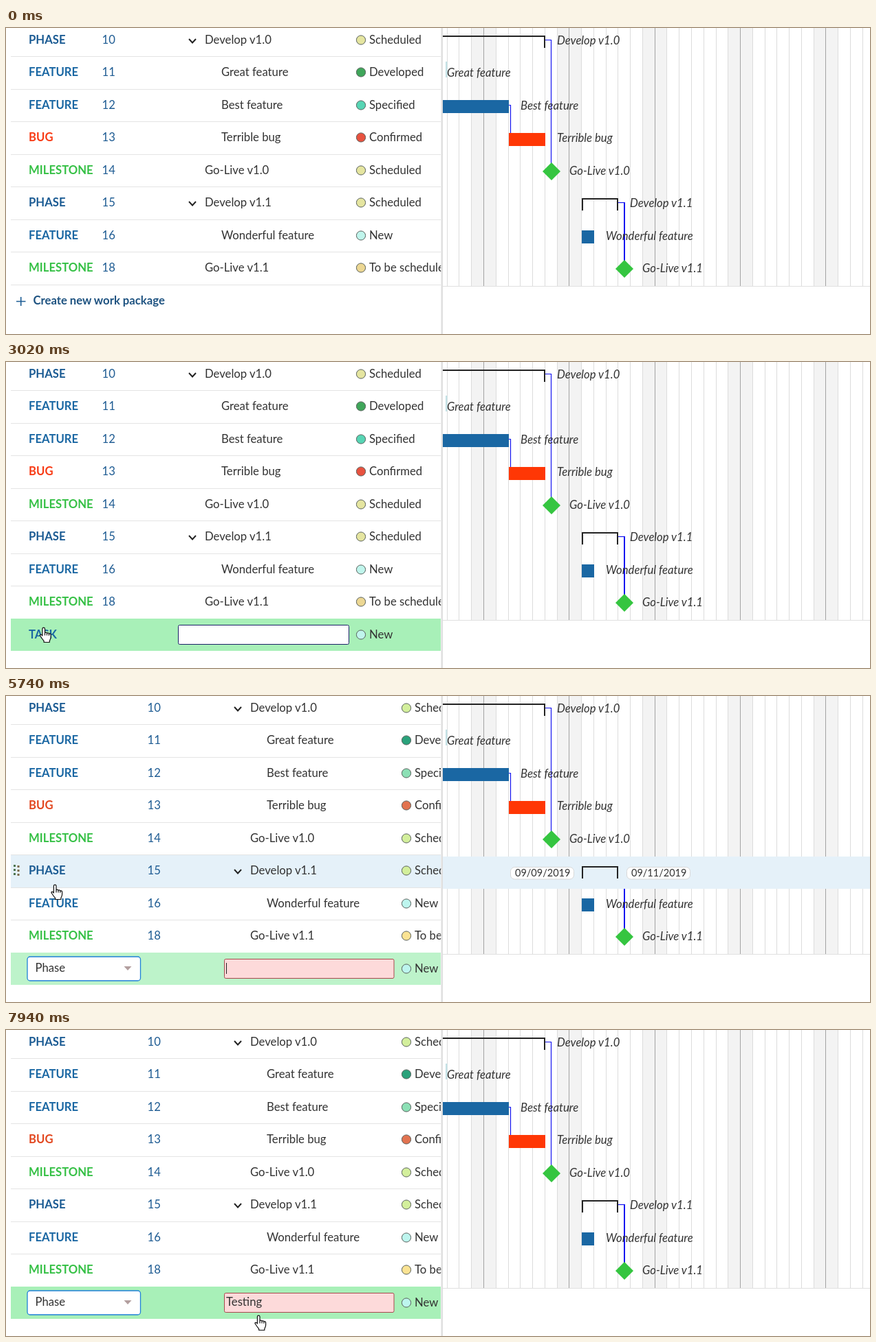
An HTML page for the animation above (8 s loop, 1256 by 446 pixels).

```html
<!DOCTYPE html>
<html lang="en">
<head>
<meta charset="utf-8">
<title>Work package table</title>
<style>
  html, body { margin: 0; width: 100%; height: 100%; overflow: hidden; background: #fff; }
  svg { display: block; width: 1256px; height: 446px; font: 16.7px Lato, sans-serif; }
  text { white-space: pre; }
</style>
</head>
<body>
<svg id="stage" viewBox="0 0 1256 446"></svg>
<script>
const stage = document.getElementById('stage');
const measure = document.createElement('canvas').getContext('2d');
const LOOP = 8000, PITCH = 47.5, BLUE = '#1a67a3', INK = '#333';

// Row: type, id, subject, status, subject x, label x in the chart
const ROWS = [
  ['PHASE', 10, 'Develop v1.0', 'Scheduled', 289, 801],
  ['FEATURE', 11, 'Great feature', 'Developed', 313, 641],
  ['FEATURE', 12, 'Best feature', 'Specified', 313, 748],
  ['BUG', 13, 'Terrible bug', 'Confirmed', 313, 801],
  ['MILESTONE', 14, 'Go-Live v1.0', 'Scheduled', 289, 819],
  ['PHASE', 15, 'Develop v1.1', 'Scheduled', 289, 907],
  ['FEATURE', 16, 'Wonderful feature', 'New', 313, 872],
  ['MILESTONE', 18, 'Go-Live v1.1', 'To be scheduled', 289, 925]
];
// Each pair: before and after the columns widen
const TYPE_COLORS = {
  PHASE: ['#1b5b93', '#1b5b93'], FEATURE: [BLUE, BLUE], TASK: [BLUE, BLUE],
  BUG: ['#f83a14', '#e2471f'], MILESTONE: ['#35c045', '#35c045']
};
const STATUS_COLORS = {
  Scheduled: ['#e5e5a0', '#d3ef9c'], Developed: ['#3fa65a', '#2aa27b'],
  Specified: ['#57d5b4', '#8ce0b5'], Confirmed: ['#e8523f', '#e27350'],
  New: ['#c0f5ec', '#bdf5ee'], 'To be scheduled': ['#ecd793', '#fbe393']
};
const OPTIONS = ['Task', 'Milestone', 'Phase', 'Feature', 'Bug'];

// Pointer tip: time, x, y
const PATH = [
  [720, 223, 441], [1240, 166, 397], [2710, 166, 397], [3020, 54.5, 387], [3100, 53, 387],
  [4113, 53, 387], [4570, 56, 304], [4960, 66, 268], [5040, 66, 268], [5120, 66, 272],
  [5270, 70, 274], [5360, 71, 275], [5740, 71, 275], [6440, 366, 422], [6520, 366, 416], [6610, 367, 416]
];
const CLICKS = [[1870, 2020, 166, 396.5], [3250, 3490, 52, 387], [5040, 5120, 66, 268]];
const KEYS = [[7070, 'T'], [7220, 'e'], [7370, 's'], [7450, 't'], [7620, 'i'], [7690, 'n'], [7860, 'g']];

const rect = (x, y, w, h, fill, extra = '') =>
  `<rect x="${x}" y="${y}" width="${w}" height="${h}" fill="${fill}" ${extra}/>`;
const line = (d, stroke, width, extra = '') =>
  `<path d="${d}" fill="none" stroke="${stroke}" stroke-width="${width}" ${extra}/>`;
const text = (x, y, s, fill = INK, extra = '') =>
  `<text x="${x}" y="${y}" fill="${fill}" ${extra}>${s}</text>`;
const shape = (d, fill) => `<path d="${d}" fill="${fill}"/>`;
const bold = 'font-weight="700"';
const baseline = i => Math.floor(23 + PITCH * i);
const rowTop = i => Math.round(PITCH * i - 6.5);

function pointer(t) {
  if (t < PATH[0][0]) return null;
  const next = PATH.findIndex(p => p[0] > t);
  if (next < 0) return PATH[PATH.length - 1].slice(1);
  const [t0, x0, y0] = PATH[next - 1], [t1, x1, y1] = PATH[next];
  const steps = Math.max(1, Math.round((t1 - t0) / 77));
  const u = Math.floor((t - t0) / (t1 - t0) * steps) / steps;
  const e = u * u * (3 - 2 * u);
  return [x0 + (x1 - x0) * e, y0 + (y1 - y0) * e];
}

function status(x, i, name, late) {
  const y = baseline(i);
  return `<circle cx="${x}" cy="${y - 5.5}" r="6.6" fill="${STATUS_COLORS[name][late]}" stroke="#58605c"/>`
    + text(x + 12, y, name);
}

function tableRow([type, id, subject, state, x], i, late) {
  const y = baseline(i), dx = late * 66;
  return rect(7, rowTop(i + 1), 625, 1, '#e4e4e4')
    + text(33, y, type, TYPE_COLORS[type][late], bold)
    + text(139.5 + dx, y, id, '#1f5c93')
    + (type === 'PHASE' ? line(`M${266 + dx} ${y - 7}l5 5.5l5-5.5`, '#222', 2) : '')
    + text(x + dx, y, subject)
    + status(516 + dx, i, state, late);
}

function grid() {
  const week = 124.35, day = week / 7;
  let out = '';
  for (let x = 694.3; x < 1256; x += week) out += rect(x - day, 0, day * 2, 376, '#f3f3f3');
  for (let n = -3; n < 32; n++) {
    const x = Math.round(694 + n * day);
    out += rect(x, 0, 1, 376, n % 7 ? '#dcdcdc' : '#a3a3a3');
  }
  return out + rect(635, 376, 621, 1, '#e0e0e0');
}

const diamond = (x, y) => shape(`M${x} ${y - 13}l13 13l-13 13l-13-13z`, '#35c540');

function badge(x, date) {
  return rect(x + .5, 249.5, 92, 17.5, '#fff', 'rx="6" stroke="#d8d8d8"')
    + text(x + 7, 263, date, INK, 'font-size="14.5"');
}

function chart(hover) {
  let out = grid() + rect(639, 49, 2.5, 23, '#c5e2e6')
    + line('M784 17.5H792.5V198', '#1414f0', 1.2)
    + line('M731 112.5H733.5V153', '#1414f0', 1.2)
    + line('M890 254.5H899', '#1414f0', 1.2) + line('M899 254V340', '#1414f0', 2);
  if (hover) out += rect(635, rowTop(hover) + 3, 621, 47, '#e5f1f9');
  out += line('M635 12H783V29', '#222', 2) + line('M838 266V249H889V266', '#222', 2)
    + rect(635, 105, 96, 19, BLUE) + rect(731, 153, 53, 19, '#ff3705') + rect(837, 295, 18, 19, BLUE)
    + diamond(793, 209) + diamond(899, 351);
  ROWS.forEach((r, i) => {
    if (hover !== 5 || i !== 5) out += text(r[5], Math.round(23.6 + PITCH * i), r[2], INK, 'font-style="italic"');
  });
  if (hover === 5) out += badge(733, '09/09/2019') + badge(902, '09/11/2019');
  return out;
}

function subjectField(t, late) {
  if (t < 2330) return '';
  const invalid = t >= 5590;
  const [x, w] = late ? [317, 246.5] : [250, 248];
  const border = invalid ? '#a8484e' : t < 2410 ? '#bbb' : '#1a2066';
  const typed = KEYS.filter(k => t >= k[0]).map(k => k[1]).join('');
  const caret = invalid && (t < 6200 || t >= 6840) && t < 7940;
  measure.font = '16.7px Lato, sans-serif';
  return rect(x + .5, 383.5, w, 28, invalid ? '#fddada' : '#fff', `rx="2" stroke="${border}"`)
    + text(320, 402, typed)
    + (caret ? rect(Math.round(320 + measure.measureText(typed).width), 389, 1, 16, '#222') : '');
}

function typeField(t, p) {
  const open = t >= 3730 && t < 5270;
  const border = t >= 5590 ? '#1f80d8' : '#c8c8c8';
  let out = rect(31, 380, 164.5, 35, '#fff', `rx="4" stroke="${border}" stroke-width="1.3"`)
    + text(42.5, 402, t < 5270 ? 'Task' : 'Phase')
    + (open ? shape('M171.5 400.5h11l-5.5-6z', '#91a283') : shape('M171.5 394h11l-5.5 6z', '#b39f9f'));
  if (!open) return out;
  out += rect(31, 154, 164.5, 226, '#fff', 'rx="4" stroke="#c8c8c8"');
  const hover = Math.floor((p[1] - 154.5) / 45.5);
  OPTIONS.forEach((name, i) => {
    const y = 155 + i * 45.5;
    if (!i || i === hover) out += rect(31.5, y, 145, i === 4 ? 43 : 45.5, i ? '#f3f9fd' : '#e9f4fe');
    out += text(42.5, Math.round(y + 28), name, INK, i ? '' : bold);
  });
  return out + rect(177, 155, 18, 224, '#f1f1f1') + rect(177, 175, 18, 182, '#c9c9c9')
    + line('M181 167l4.5-4.5l4.5 4.5M181 367l4.5 4.5l4.5-4.5', '#454b55', 1.8);
}

function handle(i) {
  let out = '';
  for (let n = 0; n < 6; n++)
    out += rect(11 + n % 2 * 5.5, rowTop(i) + 15 + (n >> 1) * 6 + n % 2, 3, 3, n % 2 ? '#7a6a4a' : '#4d7350');
  return out;
}

function newRow(t, p, hovered, late) {
  const moving = t < 2180, i = moving ? 9 : 8;
  let out = rect(7, rowTop(i), 625, 47, hovered && !moving ? '#a8f0b8' : '#bdf3ca');
  if (!late) out += text(33, baseline(i), 'TASK', BLUE, bold + (moving ? ' opacity=".7"' : ''));
  out += `<g opacity="${moving ? .6 : 1}">${status(516 + late * 66, i, 'New', late)}</g>`;
  if (t >= 3100 && !late) out += rect(30.5, 380.5, 98, 35, 'none', 'rx="2" stroke="#c5d3c9"');
  return out + subjectField(t, late) + (late ? typeField(t, p) : '');
}

function hand([x, y]) {
  return `<path transform="translate(${x.toFixed(1)} ${y.toFixed(1)})" fill="#fff" stroke="#111" stroke-width="1.2"
    stroke-linejoin="round" d="M-1.6 12V2a1.8 1.8 0 0 1 3.6 0V8c.4-1.4 3-1.2 3 .6c.4-1.2 2.9-1 2.9.8
    c.5-1.1 2.7-.6 2.7 1.2V14c0 3-1.6 4-1.8 6V21.5H.6V19.5C-1.5 17.5-3 14.5-4.8 12.2C-5.8 10.4-3.4 9.4-1.6 12z
    M2 8v3.5M5 8.6v3M7.9 9.4v2.4"/>`;
}

function scene(t) {
  const late = t >= 3650 ? 1 : 0;
  const p = pointer(t), lagged = pointer(t - 80);
  const row = lagged ? Math.floor((lagged[1] + 6.5) / PITCH) : -1;
  const hover = t >= 5740 && row < 8 ? row : 0;

  let table = hover ? rect(7, rowTop(hover) + 1, 625, 47, '#e5f1f9') : '';
  ROWS.forEach((r, i) => table += tableRow(r, i, late));
  if (t >= 5360 && row < 8) table += handle(row);
  if (t < 2180)
    table += line('M15 398.5H28.5M21.7 392V405', '#1b5b93', 1.6)
      + text(39.5, 403, 'Create new work package', '#1d5280', bold);
  if (t >= 2020) table += newRow(t, p, row === 8, late);

  let out = chart(hover)
    + `<clipPath id="table"><path d="M0 0H632.5V446H0z"/></clipPath><g clip-path="url(#table)">${table}</g>`
    + rect(632.5, 0, 2.5, 446, '#dfdfdf');
  for (const [from, to, x, y] of CLICKS)
    if (t >= from && t < to) out += `<circle cx="${x}" cy="${y}" r="14" fill="#ff0" opacity=".47"/>`;
  return out + (p ? hand(p) : '');
}

let shown = '';
function frame(now) {
  const next = scene(now % LOOP);
  if (next !== shown) stage.innerHTML = shown = next;
  requestAnimationFrame(frame);
}
frame(performance.now());
</script>
</body>
</html>
```
